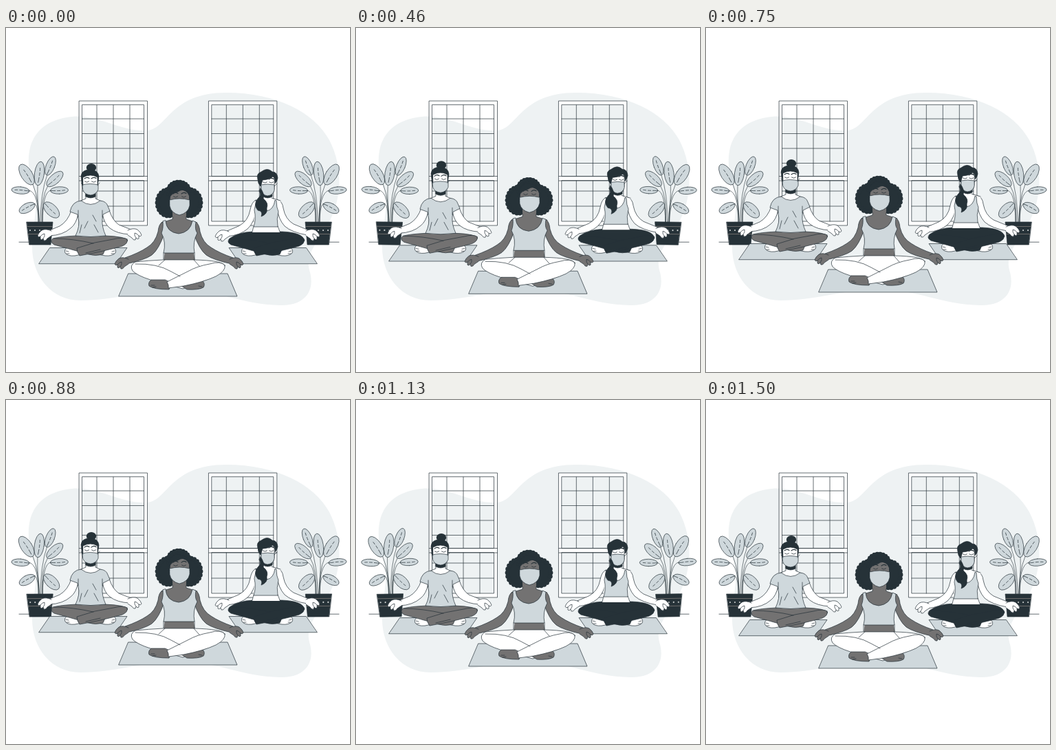
An HTML page with a canvas that plays this animation: 500 by 500 pixels, repeating every 1.54 s.

```html
<!DOCTYPE html>
<html lang="en">
<head>
<meta charset="utf-8">
<title>Meditation class</title>
<style>
html, body { margin: 0; width: 100%; height: 100%; overflow: hidden; background: #fff; }
canvas { display: block; width: 500px; height: 500px; }
</style>
</head>
<body>
<canvas id="stage"></canvas>
<script>
const LOOP = 1540, CYCLE = 1500, LIFT = 6;
const INK = '#263238', PALE = '#cfd8dc', GREY = '#737272', WHITE = '#fff';
const canvas = document.getElementById('stage');
const ctx = canvas.getContext('2d');
const ratio = window.devicePixelRatio || 1;
canvas.width = canvas.height = 500 * ratio;

const cache = new Map();
function shape(d, fill, stroke = INK, width = 0.7) {
  if (!cache.has(d)) cache.set(d, new Path2D(d));
  const path = cache.get(d);
  if (fill) { ctx.fillStyle = fill; ctx.fill(path); }
  if (stroke) { ctx.strokeStyle = stroke; ctx.lineWidth = width; ctx.stroke(path); }
}
const line = (d, color = INK, width = 0.7) => shape(d, null, color, width);

function oval(x, y, rx, ry, turn, fill, stroke) {
  ctx.beginPath();
  ctx.ellipse(x, y, rx, ry, turn * Math.PI / 180, 0, 2 * Math.PI);
  ctx.fillStyle = fill;
  ctx.fill();
  if (stroke) { ctx.strokeStyle = stroke; ctx.lineWidth = 0.7; ctx.stroke(); }
}

function moved(draw, dx, dy, sx = 1) {
  ctx.save();
  ctx.translate(dx, dy);
  ctx.scale(sx, 1);
  draw();
  ctx.restore();
}

function blob() {
  shape('M95 129C135 125 165 151 205 149C235 147 238 94 320 94C394 94 448 123 470 163C491 204 488 250 468 285C452 313 435 328 441 352C451 384 432 404 399 403C340 402 310 380 250 380C200 380 160 396 108 396C67 396 38 362 38 318C38 275 50 268 38 225C26 185 32 136 95 129Z', '#eef2f3', null);
}

// White frame with the sashes left open
function windowFrame() {
  shape('M106.5 106H205.5V287H106.5ZM110.5 112V215.5H200.5V112ZM110.5 222V281H200.5V222Z', WHITE);
  line('M106.5 215.5H205.5M106.5 222H205.5');
  for (const x of [132, 156, 180]) line(`M${x} 112V215.5M${x} 222V281`);
  for (const y of [132, 153.5, 175, 196.5, 237, 259]) line(`M110.5 ${y}H200.5`);
}

// x, y, half width, half length, tilt
const LEAVES = [
  [30, 213, 8.2, 17, -32], [48.5, 211.5, 7, 17.5, 8], [64.5, 200.5, 6.2, 14.5, 22],
  [71, 219.5, 7, 15, 48], [21, 236, 5.2, 13, -85], [77.5, 236, 5.2, 13, 88],
  [30.5, 261.5, 6.5, 12.5, -118], [66, 264.5, 8, 14.5, 135]
];
function plant() {
  line('M48 284Q49 252 39 227M49 284Q45 250 46 229M50 284Q50 240 60 213M52 284Q51 245 61 229M47 284Q48 240 34 236M53 284Q53 238 65 236M47 284Q47 256 41 255M53 284Q53 258 56 255', INK, 0.6);
  for (const [x, y, w, l, tilt] of LEAVES) {
    oval(x, y, w, l, tilt, PALE, INK);
    ctx.save();
    ctx.translate(x, y);
    ctx.rotate(tilt * Math.PI / 180);
    ctx.setLineDash([7, 3, 4, 3]);
    line('M0 13Q1 0 0 -8');
    ctx.restore();
  }
  shape('M30 282H68L65 315H34Z', INK);
  line('M31 288.5H67.5M32 299.5H66.5', '#8b8580', 0.7);
  for (let x = 35; x < 66; x += 7) oval(x, 294, 1.1, 1.1, 0, '#c9cdcd');
}

function swayingPlant(cx, angle, flip) {
  ctx.save();
  ctx.translate(cx, 251);
  ctx.rotate(angle);
  ctx.scale(flip, 1);
  ctx.translate(-49, -251);
  plant();
  ctx.restore();
}

// Resting hand, wrist at the right, fingertips at the left
function hand(fill) {
  shape('M19 -5Q11 -9 5 -6Q0 -2 -1 2Q0 5 3 3L3 7Q5 9 7 6L8 9Q11 10 13 6L19 2', fill);
  line('M3 3Q6 -1 9 -1Q10 3 7 6');
}

function closedEyes(x, y, gap) {
  for (const side of [-1, 1]) {
    const cx = x + side * gap;
    line(`M${cx - 3} ${y}Q${cx} ${y + 2.5} ${cx + 3} ${y}`, INK, 0.8);
    line(`M${cx - 3.5} ${y - 4}Q${cx} ${y - 7} ${cx + 3.5} ${y - 4.5}`, INK, 1.1);
  }
}

function sideMat() { shape('M64 319.5H176L160 342.7H48Z', PALE); }

function sideFeet() {
  shape('M105 317L89 319Q84 322 86 327Q90 332 100 331L115 328Z', WHITE);
  shape('M139 317L156 319Q161 322 159 327Q154 332 144 331L128 328Z', WHITE);
  line('M87 324L91 325M88 328L92 328M158 324L154 325M157 328L153 328');
}

function sideArms() {
  shape('M95 265Q90 281 78 288L61 295L63 302Q83 301 94 291Q102 285 105 270Z', WHITE);
  shape('M150 265Q155 280 164 286L182 293L180 300Q161 299 151 291Q143 285 140 270Z', WHITE);
  moved(() => hand(WHITE), 47, 300);
  moved(() => hand(WHITE), 196, 299, -1);
}

function sideLegs(fill, seam, waist) {
  sideFeet();
  shape(`M102 ${waist}Q80 ${waist + 1} 68 306Q63 311 70 315Q92 321 120 329Q130 332 141 329L145 320Q171 318 177 309Q174 ${waist + 1} 144 ${waist}Z`, fill);
  shape('M176 307Q171 303 156 307L129 312L103 320Q103 326 107 331Q145 324 169 317Q178 313 176 307Z', fill, seam);
  line('M70 306Q96 306 127 313M116 327L137 322', seam);
}

function leftPerson() {
  sideMat();
  sideLegs(GREY, INK, 302);
  sideArms();
  shape('M116 238V248L107 252Q123 264 139 252L130 248V238Z', WHITE);
  shape('M109 251Q123 262 137 251Q146 252 148 259L151 266L141 271L140 278Q139 289 145 302Q123 305 101 302Q108 288 105 276L104 271L93 267Q96 252 109 251Z', PALE);
  line('M105 275V265M140 275V265M119 281L114 291M128 286L134 297M126 272L131 281M110 286L107 298');
  shape('M116 240H130V245Q123 249 116 245Z', INK);
  oval(124, 203, 7.2, 6, 0, INK);
  shape('M109 215Q110 206 122 206Q134 206 135 216L133 230H111Z', INK);
  shape('M112 217Q123 211 133 217V233Q131 242 123 243Q114 242 112 233Z', WHITE);
  closedEyes(122.5, 223, 5);
  shape('M111 228Q122 225 134 228V235Q131 242 123 243Q114 242 112 236Z', PALE);
  line('M112 229L109 225M133 229L136 225');
}

function rightPerson() {
  moved(sideMat, 500, 0, -1);
  moved(() => sideLegs(INK, INK, 296), 257, 0);
  shape('M363 250Q357 253 355 264Q352 281 338 288L319 296L321 303Q341 301 351 292Q361 283 364 264Z', WHITE);
  shape('M395 250Q402 252 403 262Q406 278 418 285L440 294L438 301Q415 297 405 288Q396 278 394 262Z', WHITE);
  moved(() => hand(WHITE), 305, 301);
  moved(() => hand(WHITE), 455, 300, -1);
  shape('M374 240V248L362 251L361 270Q361 283 358 297H398Q394 284 395 269L399 251L386 248V240Z', WHITE, null);
  line('M374 247L362 251M386 247L399 251M360 288L358 296M395 288L398 296');
  shape('M364 251Q365 264 379 266Q389 264 391 250L393 251Q393 261 396 267Q393 277 395 289H360Q364 277 361 265Z', PALE);
  shape('M374 240H387V245Q380 249 374 245Z', INK);
  shape('M371 220Q380 213 390 220V234Q389 243 380 244Q372 243 371 234Z', WHITE);
  closedEyes(381, 224, 4.6);
  shape('M371 228Q380 226 390 228V236Q388 243 380 244Q373 243 371 236Z', PALE);
  line('M371 230L368 227M390 230L394 226');
  shape('M366 220Q363 212 371 209Q380 202 387 209Q394 209 395 218Q394 223 391 226Q391 218 388 216Q381 221 373 221L370 230Q366 226 366 220Z', INK);
  shape('M370 233Q376 241 374 248Q382 254 379 262Q381 270 371 274Q374 266 366 265Q359 257 366 248Q372 243 368 237Z', INK);
}

function curls(x, y, rx, ry) {
  oval(x, y, rx, ry, 0, INK);
  const count = 22;
  for (let i = 0; i < count; i++) {
    const a = i / count * 2 * Math.PI;
    oval(x + (rx - 1) * Math.cos(a), y + (ry - 1) * Math.sin(a), 3.4, 3.4, 0, INK);
  }
}

function frontHair() {
  curls(236, 254, 17, 20);
  curls(267, 254, 17, 20);
  curls(251, 237, 16, 14);
}

function frontArm() {
  shape('M227 282Q222 285 221 296Q217 312 205 319Q193 327 173 334L175 343Q202 337 212 330Q222 322 230 299Z', GREY);
  moved(() => hand(GREY), 159, 341);
}

function frontPerson() {
  shape('M178 357H322L336 390H164Z', PALE);
  frontHair();
  frontArm();
  moved(frontArm, 503, 0, -1);
  shape('M242 266V278L226 283L228 300Q233 316 229 339H275Q270 316 274 300L278 283L262 278V266Z', GREY, null);
  line('M242 274V278L226 283M262 274V278L278 283M229 297L231 303M275 297L273 303');
  shape('M232 280Q233 297 251 299Q268 297 271 280L276 282Q274 293 278 298Q271 311 274 327H229Q233 311 226 298Q229 291 228 281Z', PALE);
  line('M229 327V337M274 327V337');

  shape('M228 337Q207 338 188 340Q179 345 184 353Q191 360 210 366L257 379L279 371L298 363Q319 354 318 345Q314 338 274 337Z', WHITE);
  shape('M231 366L211 366Q206 370 208 375Q215 380 237 380L241 371Z', GREY);
  shape('M270 371L286 368Q290 372 287 377Q280 381 263 380L255 375Z', GREY);
  shape('M318 345Q312 338 296 343Q278 346 264 354L234 369Q237 374 236 378L258 375Q288 369 305 361Q320 353 318 345Z', WHITE);
  line('M188 343Q220 342 240 354L253 361M231 337L222 345M273 337L281 346M211 374L216 374M213 377L218 376M285 376L280 375');

  shape('M239 244Q240 236 252 235Q264 236 266 244V258Q264 269 252 272Q240 269 238 258Z', GREY, null);
  shape('M237 247Q235 235 247 229Q265 230 267 243L264 237Q257 233 250 238Q242 239 237 247Z', INK);
  closedEyes(252.5, 245, 6);
  shape('M238 250Q252 246 267 250V258Q265 269 252 272Q240 269 238 259Z', PALE);
  line('M238 252L235 249M267 252L270 249');
}

function triangle(p) { return 1 - Math.abs(2 * p - 1); }

// Zero, up at a quarter, down at three quarters
function swing(p) {
  if (p < 0.25) return 4 * p;
  return p < 0.75 ? 2 - 4 * p : 4 * p - 4;
}

function render(now) {
  const p = Math.min(now % LOOP, CYCLE) / CYCLE;
  const dy = -LIFT * triangle(p);
  const sway = swing(p) * Math.PI / 180;

  ctx.setTransform(ratio, 0, 0, ratio, 0, 0);
  ctx.lineJoin = ctx.lineCap = 'round';
  ctx.fillStyle = WHITE;
  ctx.fillRect(0, 0, 500, 500);
  blob();
  windowFrame();
  moved(windowFrame, 188.3, 0);
  line('M19 311.2H36M467 311.2H484');
  swayingPlant(49, sway, 1);
  swayingPlant(454, sway, -1);
  moved(() => { leftPerson(); rightPerson(); frontPerson(); }, 0, dy);
}

const start = performance.now();
function tick() {
  render(performance.now() - start);
  requestAnimationFrame(tick);
}
tick();
</script>
</body>
</html>
```
